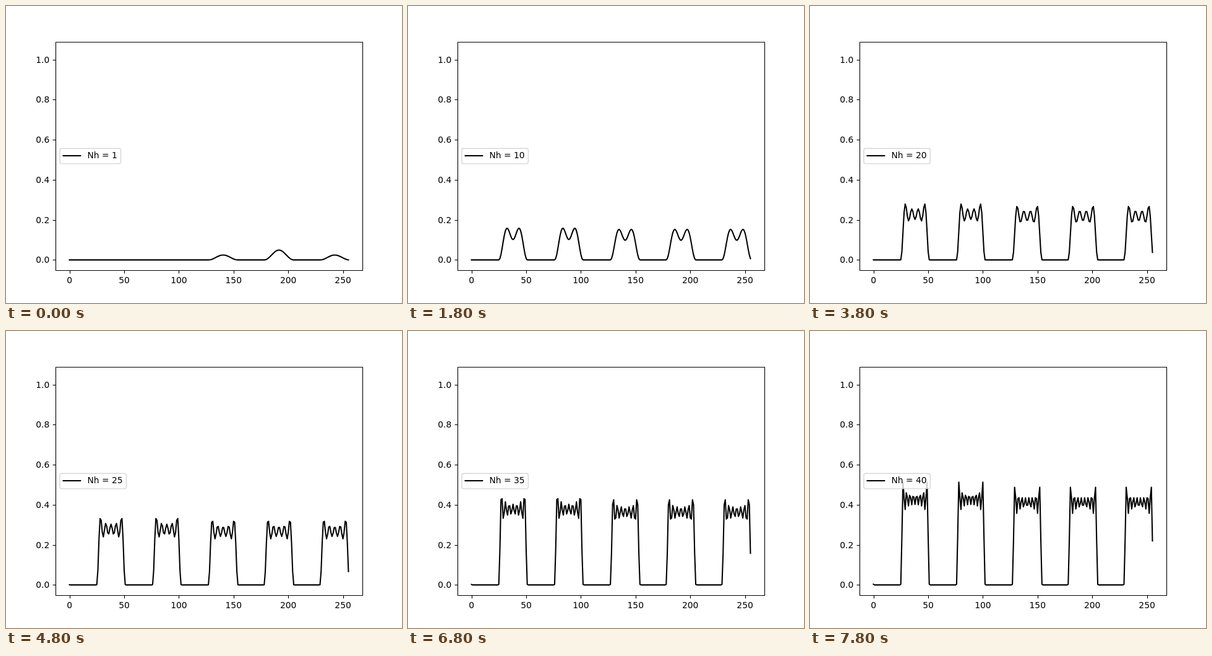
Animation, 640 px wide and 480 px high, one loop 8000 ms. Source, as an HTML page with a canvas:

```html
<!DOCTYPE html>
<html lang="en">
<head>
<meta charset="utf-8">
<title>Density in five wells</title>
<style>
  html, body { margin: 0; width: 100%; height: 100%; overflow: hidden; background: #fff; }
  canvas { display: block; }
</style>
</head>
<body>
<canvas width="640" height="480"></canvas>
<script>
const ctx = document.querySelector('canvas').getContext('2d');
const SITES = 256, STEP_MS = 200, STEPS = 40;
const FONT = '13.889px "DejaVu Sans", sans-serif';

const toX = site => 102.545 + site * 1.76827;
const toY = value => 410.4 - value * 323.8;
const snap = v => Math.round(v) + 0.5;

// Each level holds five states: three shared by the wide wells, then two by the narrow ones.
// `filling` is the occupied share of the topmost level after 0 to 4 of its states.
const narrow = [0, 0, 0, 0, 0.5];
const outer = [0, 0.25, 0.75, 1, 1];
const middle = [0, 0.5, 0.5, 1, 1];
const wells = [
  { first: 26, size: 25, filling: narrow },
  { first: 77, size: 25, filling: narrow },
  { first: 128, size: 26, filling: outer },
  { first: 179, size: 26, filling: middle },
  { first: 230, size: 26, filling: outer }
];

function density(count) {
  const values = new Array(SITES).fill(0);
  const level = Math.floor(count / 5);
  const scale = 1.326 - 0.0005 * count;
  const leak = 0.016;
  for (const { first, size, filling } of wells) {
    const length = size + 1;
    for (let j = 1; j <= size; j++) {
      let sum = 0;
      for (let n = 1; n <= level + 1; n++) {
        const share = n <= level ? 1 : filling[count % 5];
        sum += share * Math.sin(n * Math.PI * j / length) ** 2;
      }
      values[first + j - 1] = scale * 2 / length * sum;
    }
    const edge = values[first] * leak;
    values[first - 1] += edge;
    values[(first + size) % SITES] += edge;
  }
  return values;
}

function line(points, width, cap = 'butt') {
  ctx.beginPath();
  for (const [x, y] of points) ctx.lineTo(x, y);
  ctx.lineWidth = width;
  ctx.lineCap = cap;
  ctx.lineJoin = 'round';
  ctx.strokeStyle = '#000';
  ctx.stroke();
}

function label(text, x, y, align) {
  ctx.font = FONT;
  ctx.textAlign = align;
  ctx.fillStyle = '#000';
  ctx.fillText(text, x, y);
}

function drawAxes() {
  for (let site = 0; site <= 250; site += 50) {
    const x = snap(toX(site));
    line([[x, 427.5], [x, 432.4]], 1.11);
    label(site, toX(site), 448, 'center');
  }
  for (let i = 0; i <= 5; i++) {
    const y = snap(toY(i / 5));
    line([[80.5, y], [75.6, y]], 1.11);
    label((i / 5).toFixed(1), 70.3, Math.round(toY(i / 5) + 5), 'right');
  }
  ctx.lineWidth = 1.11;
  ctx.strokeRect(80.5, 58.5, 496, 369);
}

function drawLegend(count) {
  ctx.beginPath();
  ctx.roundRect(86.95, 230.3, count < 10 ? 98.6 : 107.4, 24.6, 2.8);
  ctx.fillStyle = 'rgba(255,255,255,0.8)';
  ctx.fill();
  ctx.strokeStyle = 'rgba(204,204,204,0.8)';
  ctx.lineWidth = 1.39;
  ctx.stroke();
  line([[92.5, 242], [120.3, 242]], 2.08, 'square');
  label('Nh = ' + count, 131.4, 246, 'left');
}

function draw(count) {
  ctx.fillStyle = '#fff';
  ctx.fillRect(0, 0, 640, 480);
  line(density(count).map((v, i) => [toX(i), toY(v)]), 2.08, 'square');
  drawAxes();
  drawLegend(count);
}

function tick() {
  draw(1 + Math.floor(performance.now() / STEP_MS) % STEPS);
  requestAnimationFrame(tick);
}
tick();
</script>
</body>
</html>
```
